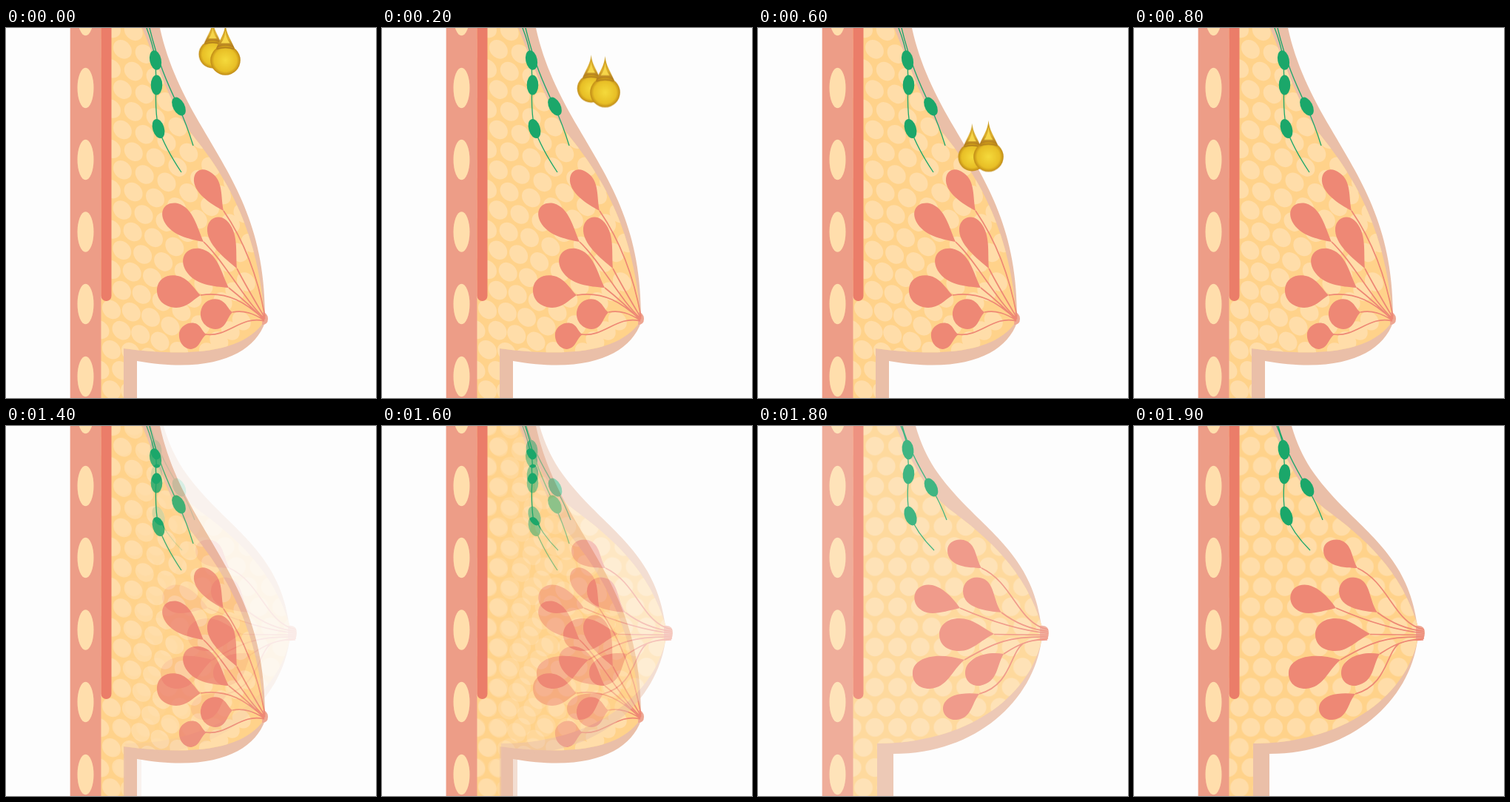
An HTML page without scripts for the animation above (4 s loop, 500 by 500 pixels).

```html
<!DOCTYPE html>
<html lang="en">
<head>
<meta charset="utf-8">
<title>Breast lift cross-section</title>
<style>
  html, body { margin: 0; width: 100%; height: 100%; overflow: hidden; background: #fdfdfd; }
  svg { display: block; width: 100vw; height: 100vh; }

  .skin { fill: #eabfa8; }
  .fat { fill: #ffd28a; }
  .dots { fill: none; stroke: #ffdda9; stroke-width: 25; stroke-linecap: round; stroke-dasharray: 0 54.3; }
  .glands { fill: #ee8875; }
  .ducts { fill: none; stroke: #ee8875; stroke-width: 1.7; }
  .nipple { fill: #eea692; }
  .nodes { fill: #1ba76a; }
  .vessels { fill: none; stroke: #1ba76a; stroke-width: 1.3; }

  .before, .after, .drops, .fall { animation: 4s -1ms infinite; }
  .before { animation-name: hide; animation-timing-function: step-end; }
  .after { animation-name: reveal; }
  .drops { animation-name: absorb; }
  .fall { animation-name: fall; }
  .back { --end: translate(10px, 139px); }
  .front { --end: translate(15px, 130.5px); }

  @keyframes fall {
    0% { transform: none; animation-timing-function: steps(6, end); }
    15%, 100% { transform: var(--end); }
  }
  @keyframes absorb {
    0% { opacity: 1; }
    15% { opacity: 1; animation-timing-function: steps(2, end); }
    20%, 100% { opacity: 0; }
  }
  @keyframes reveal {
    0% { opacity: 0; }
    32.5% { opacity: 0; animation-timing-function: steps(6, end); }
    47.5%, 100% { opacity: 1; }
  }
  @keyframes hide {
    0% { opacity: 1; }
    45%, 100% { opacity: 0; }
  }
</style>
</head>
<body>
<svg viewBox="0 0 500 500">
  <defs>
    <path id="fatBefore" d="M128 0H184C205 50 222 105 253 146C295 198 339 268 349 385L348 398C325 430 272 448 159 433V500H128Z"/>
    <path id="fatAfter" d="M128 0H186C208 50 225 85 258 112C310 150 362 195 384 272L383 290C366 368 280 429 161 429V500H128Z"/>
    <clipPath id="clipBefore"><use href="#fatBefore"/></clipPath>
    <clipPath id="clipAfter"><use href="#fatAfter"/></clipPath>

    <pattern id="lattice" x="142.5" y="0" width="30.7" height="54.3" patternUnits="userSpaceOnUse">
      <path d="M0 0V55M30.7 0V55M15.35 27.15V28" class="dots"/>
    </pattern>

    <ellipse id="rib" cx="107.5" rx="11" ry="27.2" fill="#ffdeac"/>
    <ellipse id="node" rx="7.8" ry="13.4"/>

    <g id="chest">
      <path d="M86.700 0H128.500V500H86.700Z" fill="#ed9d87"/>
      <use href="#rib" y="-17"/>
      <use href="#rib" y="81"/>
      <use href="#rib" y="178"/>
      <use href="#rib" y="275.500"/>
      <use href="#rib" y="373"/>
      <use href="#rib" y="471"/>
      <path d="M128.500 0H142.500V362a7 7 0 0 1-14 0Z" fill="#eb7d69"/>
    </g>

    <radialGradient id="gold">
      <stop offset="0" stop-color="#f5da3c"/>
      <stop offset=".75" stop-color="#e8bf26"/>
      <stop offset="1" stop-color="#c08a16"/>
    </radialGradient>
    <linearGradient id="neck" x2="0" y2="1">
      <stop offset="0" stop-color="#c8981c"/>
      <stop offset=".6" stop-color="#dcae2c"/>
      <stop offset="1" stop-color="#a8711c"/>
    </linearGradient>
    <g id="drop">
      <path d="M0-49C1-36 7-29 12.500-16H-12.500C-7-29-1-36 0-49Z" fill="url(#neck)"/>
      <circle r="20.300" fill="url(#gold)"/>
      <path d="M0-40Q1-29 6-23H-6Q-1-29 0-40Z" fill="#f6d64a"/>
      <path d="M-12-15Q0-19 12-15" fill="none" stroke="#b07c1c" stroke-width="1.500"/>
    </g>
  </defs>

  <g class="before">
    <path class="skin" d="M128 0H208C219 50 240 92 266 136C304 202 349 265 350 385V398C335 440 280 468 177 450V500H128Z"/>
    <use href="#fatBefore" class="fat"/>
    <g clip-path="url(#clipBefore)">
      <!-- one dashed line per column of fat cells, sagging outwards -->
      <path class="dots" transform="skewY(12)" d="M127-54V480M142.500-84.200V480M157.400-58.900V170l-2 300M172.300-86.600V170l-5 300M187.200-59V170l-8 300M202.100-84.800V170l-11 300M217-55V170l-13 300M231.900-78.600V170l-16 300M246.800-46.900V170l-18 300M261.700-68.200V170l-21 300M276.600-34.400V170l-24 300M291.500-53.700V170l-26 300M306.400-17.600V170l-29 300M321.300-34.600V170l-31 300M336.200 3.300V170l-34 300"/>
    </g>
    <use href="#chest"/>
    <path class="nipple" d="M347 384Q354 386 354 393Q354 401 346 401Z"/>
    <path class="vessels" d="M190 0Q198 20 202 43L203 77Q201 110 206 136Q215 162 237 195M194 0C205 45 218 75 233 106Q244 130 253 159"/>
    <g class="nodes">
      <use href="#node" transform="translate(202 43.500) rotate(-12)"/>
      <use href="#node" transform="translate(203.500 77)"/>
      <use href="#node" transform="translate(233.500 106) rotate(-28)"/>
      <use href="#node" transform="translate(206 136) rotate(-17)"/>
    </g>
    <path class="ducts" d="M294 247C320 285 340 335 350 390M312 325C325 350 340 375 350 392M267 289C295 315 322 368 350 393M301 351C320 366 335 380 349 395M263 361C300 355 325 372 349 394M306 384C322 381 335 386 349 395M270 414C300 418 318 388 349 396"/>
    <path class="glands" d="M294 247C277 238 252 222 254 203C256 190 268 188 278 196C294 207 290 229 294 247ZM312 325C297 312 270 292 272 270C274 256 288 251 298 260C315 276 310 302 312 325ZM267 289C246 285 224 280 214 262C206 246 216 234 232 237C253 243 258 269 267 289ZM301 351C280 349 256 348 243 328C233 310 244 296 262 298C287 303 291 332 301 351ZM263 361C252 368 244 378 230 378C212 377 203 366 204 352C206 336 222 331 236 336C250 342 255 354 263 361ZM306 384C297 394 298 406 283 407C270 406 262 396 263 384C265 370 277 364 288 367C299 371 300 381 306 384ZM271 414C262 420 263 432 250 434C238 433 233 422 234 412C237 400 250 396 258 400C265 404 265 411 271 414Z"/>
  </g>

  <g class="after">
    <path class="skin" d="M128 0H213C226 45 246 72 283 110C330 157 372 190 383 270V290C372 370 296 443 183 443V500H128Z"/>
    <use href="#fatAfter" class="fat"/>
    <path d="M128 0H400V500H128Z" fill="url(#lattice)" clip-path="url(#clipAfter)"/>
    <use href="#chest"/>
    <path class="nipple" d="M381 270Q393 268 393 280Q393 292 381 290Z"/>
    <path class="vessels" d="M193 0Q200 15 202 32L204 65Q200 100 205 120Q214 144 238 168M195 0C203 30 220 60 234 83Q246 103 255 127"/>
    <g class="nodes">
      <use href="#node" transform="translate(202.500 32) rotate(-8)"/>
      <use href="#node" transform="translate(203.500 65) rotate(4)"/>
      <use href="#node" transform="translate(234 83) rotate(-28)"/>
      <use href="#node" transform="translate(206 121.500) rotate(-20)"/>
    </g>
    <path class="ducts" d="M302 192C345 212 352 268 392 275M329 252C350 268 370 275 392 277.500M273 246C310 262 350 276 392 280M319 281.500L392 282.500M279 316C320 292 340 284 392 285M332 308C345 300 360 289 392 287M299 362C342 350 340 308 358 294Q372 288 391 289"/>
    <path class="glands" d="M302 192C285 192 256 190 256 168C256 155 272 150 283 156C295 163 294 178 302 192ZM329 252C310 250 277 247 277 223C277 208 293 200 306 207C320 215 318 236 329 252ZM273 246C255 250 240 255 228 252C210 247 207 228 217 219C233 207 255 220 273 246ZM319 281C300 290 290 304 272 304C254 304 245 294 245 282C245 269 256 260 272 260C290 260 303 272 319 281ZM279 316C262 330 256 354 232 355C216 355 208 345 209 332C211 314 238 304 279 316ZM332 308C322 324 325 346 300 351C285 352 277 340 281 327C287 312 308 304 332 308ZM299 362C288 376 289 395 268 397C254 398 246 385 252 374C260 362 278 360 299 362Z"/>
  </g>

  <g class="drops">
    <g class="fall back"><use href="#drop" transform="translate(279.300 35.500) scale(.93)"/></g>
    <g class="fall front"><use href="#drop" transform="translate(296.500 43.500)"/></g>
  </g>
</svg>
</body>
</html>
```
